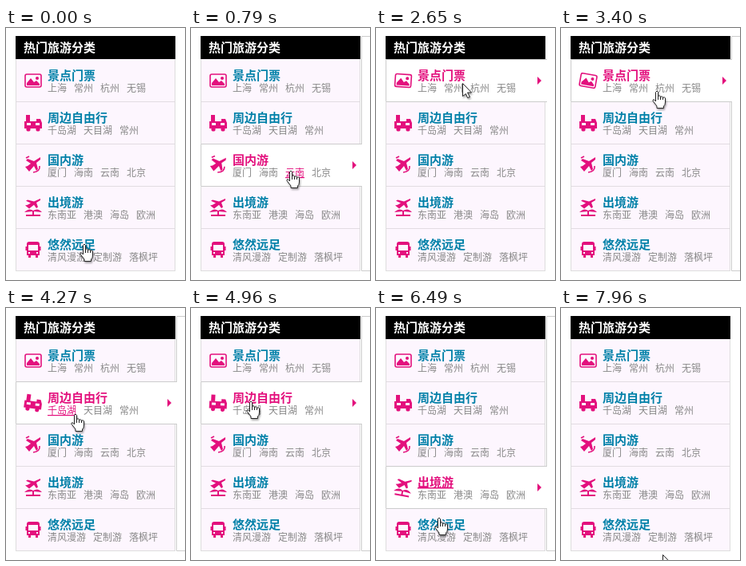
Write an HTML page that moves like this. It is 224 px wide and 316 px high and loops after 7.99 s.

```html
<!DOCTYPE html>
<html lang="zh-CN">
<head>
<meta charset="utf-8">
<title>热门旅游分类</title>
<style>
  html, body { margin: 0; width: 224px; height: 316px; overflow: hidden; background: #fff; }
  svg { display: block; }
  text { font: 12px "Noto Sans CJK SC", "Noto Sans CJK", sans-serif; fill: #888; }
  .title { font-size: 15px; font-weight: bold; fill: #0080a8; }
  .head { fill: #fff; }
  .hot { display: none; }
  .active .hot { display: inline; }
  .active .title, text.over { fill: #e3107d; }
  text.over { text-decoration: underline; }
  .icon { fill: #e3107d; }
  .line { fill: none; stroke: #e3107d; stroke-width: 1.6; }
  .pale { fill: #fdf6fe; }
  .cursor { fill: #fff; stroke: #222; stroke-linejoin: round; filter: drop-shadow(1px 2px 1px #0005); }
</style>
</head>
<body>
<svg id="stage" width="224" height="316" viewBox="0 0 224 316"></svg>
<script>
const LOOP = 7990, LAG = 60, PANEL_DELAY = 180, TOP = 39, ROW = 53;

// Icons are drawn around their own centre.
const mirrored = shape => `${shape}<g transform="scale(-1 1)">${shape}</g>`;
const plane = `<path d="M9-10 1-5l-8-3-2 2 6 4-4 3-3 1 5 6 6-7 3 6 2-2-2-8 5-4Z"/>`;
const icons = [
  `<rect class="line" x="-10" y="-8" width="20" height="16" rx="2"/>
   <circle cx="5" cy="-3" r="2"/><path d="M-8 6V3l5-6 4 5 3-2 4 4v2Z"/>`,
  `<path d="M-11-2H4v-3h5l2 5v7h-22ZM-9-10h5v8h-5Z"/>
   ${mirrored(`<path class="pale" d="M-8 0h5v3h-5Z"/><circle cx="-6" cy="8" r="2.6"/>`)}`,
  `${plane}<path class="line" d="M-9-9l4-2M8 1q1 7-8 8"/>`,
  `<g transform="translate(0 -4) scale(1 .7)">${plane}</g>
   <path d="M-11 6Q-5 0 0 4 6 0 11 6L1 5v4h8v2H-9V9h8V5Z"/>`,
  mirrored(`<path d="M0-10h-5q-3 0-3 3v3h-1.5v5H-8v6h2v3h3V7h3Z"/>
   <path class="pale" d="M0-6h-6v7h6ZM-6 3h2v2h-2Z"/>`)
];

const menu = [
  "景点门票 上海 常州 杭州 无锡",
  "周边自由行 千岛湖 天目湖 常州",
  "国内游 厦门 海南 云南 北京",
  "出境游 东南亚 港澳 海岛 欧洲",
  "悠然远足 清风漫游 定制游 落枫坪"
].map(line => line.split(" "));

// Pointer path: time, x, y
const path = [
  [0, 98, 271], [300, 112, 245], [850, 126, 172], [1400, 140, 128], [1720, 131, 117],
  [2200, 60, 70], [2450, 10, 62], [2500, 10, 65], [2570, 32, 68], [2650, 108, 69],
  [3300, 120, 62], [3750, 110, 165], [4200, 84, 132], [4270, 87, 133], [4760, 120, 160],
  [5000, 70, 114], [5560, 75, 170], [5620, 82, 187], [5680, 84, 203], [6000, 110, 236],
  [6430, 70, 222], [6490, 79, 263], [6700, 70, 290], [7000, 150, 288], [7300, 130, 292],
  [7560, 120, 320], [7740, 124, 322], [7785, 125, 313], [7830, 125, 322], [7930, 126, 320],
  [7960, 127, 309], [LOOP, 127, 306]
];

// Smooth curve through the path points
function pointer(time) {
  const t = (time + LOOP) % LOOP;
  const i = path.findIndex(p => p[0] > t) - 1;
  const a = path[i], b = path[i + 1], before = path[i - 1] || a, after = path[i + 2] || b;
  const span = b[0] - a[0], u = (t - a[0]) / span;
  return [1, 2].map(k => {
    const out = (b[k] - before[k]) / (b[0] - before[0]) * span;
    const into = (after[k] - a[k]) / (after[0] - a[0]) * span;
    return a[k] + u * (out + u * (3 * (b[k] - a[k]) - 2 * out - into
      + u * (2 * (a[k] - b[k]) + out + into)));
  });
}

function rowAt([x, y]) {
  const row = Math.floor((y - TOP) / ROW);
  return x >= 12 && x < 214 && row >= 0 && row < menu.length ? row : -1;
}

const links = [];
function rowMarkup(words, row) {
  let x = 52;
  const y = TOP + row * ROW;
  const texts = words.map((word, i) => {
    const left = i ? x : 52, width = word.length * (i ? 12 : 15);
    if (i) x += width + 9;
    links.push({ left, right: left + width, top: y + (i ? 30 : 12), bottom: y + (i ? 44 : 28) });
    return `<text class="link ${i ? "" : "title"}" x="${left}" y="${i ? 41 : 26}">${word}</text>`;
  });
  return `<g class="row" transform="translate(0 ${y})">
    <g class="hot"><path fill="#fff" d="M12 0H214V54H12Z"/>
      <path fill="none" stroke="#ccc" d="M214 .5H12.5v53H214"/>
      <path class="icon" d="M202 22l5 5-5 5Z"/></g>
    <g transform="translate(34 27)"><g class="icon">${icons[row]}</g></g>
    ${texts.join("")}</g>`;
}

const dividers = [1, 2, 3, 4].map(i => `M13 ${TOP + i * ROW + .5}H211`).join("");
const stage = document.getElementById("stage");
stage.innerHTML = `
  <path id="panel" fill="#fff" stroke="#ccc" d="M226 10.5H213.5v294H226"/>
  <rect x="12.5" y="38.5" width="199" height="266" fill="#fdf6fe" stroke="#ddd"/>
  <path stroke="#e2dce2" d="${dividers}"/>
  <path d="M12 10H212V39H12Z"/>
  <text class="title head" x="22" y="30">热门旅游分类</text>
  ${menu.map(rowMarkup).join("")}
  <g id="pointer" class="cursor">
    <path id="arrow" d="M.5 .5v16l4-3 2 5 3-1-3-5.500h5Z"/>
    <path id="hand" d="M-1.5 13V1.5q1.5-3 3 0V7q1.5-3 3 0v1q1.5-3 3 0v1q1.5-3 3 0v5q0 4-2 5v2.5H0V19l-5-6.5q0-4 3.5 .5M1.5 7v4m3-3v3m3-2v2"/>
  </g>`;

const find = id => document.getElementById(id);
const rows = [...stage.querySelectorAll(".row")];
const rowIcons = rows.map(row => row.querySelector("g > g.icon"));
const labels = [...stage.querySelectorAll(".link")];
const linkAt = ([x, y]) => links.findIndex(l => x >= l.left && x < l.right && y >= l.top && y < l.bottom);
const show = (id, on) => find(id).style.display = on ? "" : "none";

// The icon of a hovered row leans over within 200 ms.
function tilt(time, row) {
  let held = 0;
  while (held < 200 && rowAt(pointer(time - held)) === row) held += 20;
  return held / 20;
}

function draw(now) {
  const t = now % LOOP, tip = pointer(t), seen = pointer(t - LAG);
  const active = rowAt(seen), over = linkAt(seen), hand = linkAt(tip) >= 0;
  rows.forEach((row, i) => {
    row.classList.toggle("active", i === active);
    rowIcons[i].setAttribute("transform", `rotate(${i === active ? tilt(t - LAG, i) : 0})`);
  });
  labels.forEach((label, i) => label.classList.toggle("over", i === over));
  show("panel", active >= 0 && rowAt(pointer(t - PANEL_DELAY)) >= 0);
  show("hand", hand);
  show("arrow", !hand);
  find("pointer").setAttribute("transform", `translate(${tip.map(Math.round)})`);
}

const start = performance.now();
function tick() {
  draw(performance.now() - start);
  requestAnimationFrame(tick);
}
tick();
</script>
</body>
</html>
```
